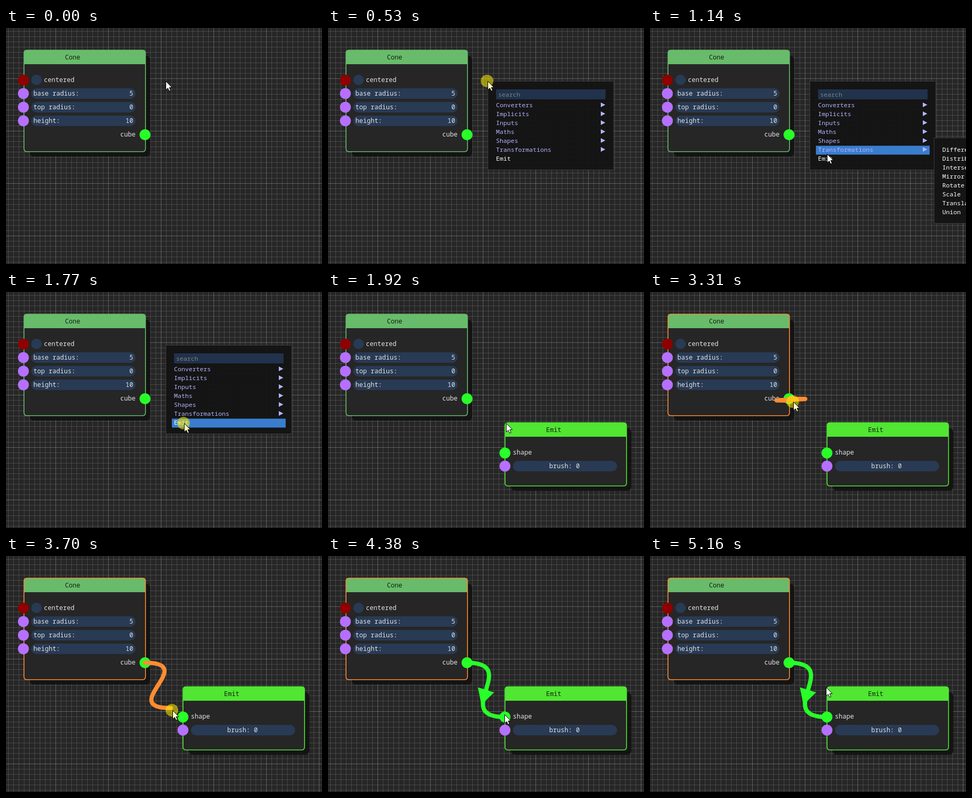
An HTML page that plays this animation: 600x450 px, repeating every 5310 ms.

```html
<!DOCTYPE html>
<html lang="en">
<head>
<meta charset="utf-8">
<title>Node editor</title>
<style>
  html, body { margin: 0; width: 100%; height: 100%; overflow: hidden; background: #262626; }
  svg { display: block; width: 600px; height: 450px; }
  text { font: 12.08px "Noto Sans Mono", "DejaVu Sans Mono", monospace; fill: #e4e4e4; white-space: pre; }
  .menu text { font-size: 11.67px; fill: #fff; }
  .menu .sub { fill: #b4b4ff; }
  .menu .hint { fill: #808080; }
  .title { fill: #12200f; }
</style>
</head>
<body>
<svg id="stage" viewBox="0 0 600 450"></svg>
<script>
const LOOP = 5310;
const GREEN = '#28ff28', ORANGE = '#ff8c32', PURPLE = '#b670ff', FIELD = '#283a54';
const OUT = [264, 203.5], IN = [336, 307];

const text = (x, y, s, cls = '', anchor = 'start') =>
  `<text x="${x}" y="${y + 4}" class="${cls}" text-anchor="${anchor}">${s}</text>`;
const rect = (x, y, w, h, fill, more = '') =>
  `<rect x="${x}" y="${y}" width="${w}" height="${h}" fill="${fill}" ${more}/>`;
const dot = (x, y, fill, r = 10.5, more = '') =>
  `<circle cx="${x}" cy="${y}" r="${r}" fill="${fill}" ${more}/>`;

function grid() {
  const lines = (step, color) => {
    let d = '';
    for (let x = 94 % step; x < 600; x += step) d += `M${x + .5} 0V450`;
    for (let y = 96 % step; y < 450; y += step) d += `M0 ${y + .5}H600`;
    return `<path d="${d}" stroke="${color}" fill="none"/>`;
  };
  return lines(10, 'rgba(200,200,200,.2)') + lines(100, 'rgba(200,200,200,.2)');
}

function node(id, title, x, y, w, h, color) {
  return rect(x + 11, y + 11, w - 2, h - 2, '#101010', 'rx="8" opacity=".88"') +
    rect(x, y, w, h, '#262626', 'rx="5"') +
    `<path d="M${x} ${y + 27}v-22q0-5 5-5h${w - 10}q5 0 5 5v22z" fill="${color}"/>` +
    rect(x + .2, y + .2, w - .4, h - .4, 'none', `id="${id}" rx="5" stroke="${color}" stroke-width="1.6"`) +
    text(x + 92.5, y + 14, title, 'title', 'middle');
}

function slider(y, label, value) {
  return dot(33, y, PURPLE) + rect(48, y - 10, 198, 20, FIELD, 'rx="10"') +
    text(52, y, label) + text(241.5, y, value, '', 'end');
}

const cone = node('coneEdge', 'Cone', 34, 42, 231, 194, '#68bb6b') +
  dot(33, 99.5, '#8f0000') + dot(58, 99, FIELD, 10) + text(72, 99, 'centered') +
  slider(125, 'base radius:', 5) + slider(151, 'top radius:', 0) + slider(177, 'height:', 10) +
  text(217, 203, 'cube') + dot(...OUT, GREEN);

const emit = node('emitEdge', 'Emit', 336, 249, 231, 121, '#50e632') +
  dot(...IN, GREEN, 10.5, 'id="inSocket"') + text(351, 306, 'shape') +
  dot(336, 332, PURPLE) + rect(351, 322, 198, 20, FIELD, 'rx="10"') +
  text(449, 332, 'brush: 0', '', 'middle');

const panel = (x, y, w, h) => rect(x + .5, y + .5, w, h, '#141414', 'fill-opacity=".96" stroke="#3c3c42"');
const rowY = i => 147 + 17 * i;
const groups = ['Converters', 'Implicits', 'Inputs', 'Maths', 'Shapes', 'Transformations'];
const transforms = ['Difference', 'Distribute', 'Intersection', 'Mirror', 'Rotate', 'Scale', 'Translate', 'Union'];

const menu = panel(303, 101, 239, 169) +
  rect(319, 117, 208, 19, '#20324c') + text(323, 127, 'search', 'hint') +
  rect(315, 0, 216, 17, '#3a7dce', 'id="hover"') +
  groups.map((s, i) => text(319, rowY(i), s, 'sub') +
    `<path d="M518 ${rowY(i) - 5}l8.5 4.5l-8.5 4.5z" fill="#b4b4ff"/>`).join('') +
  text(319, rowY(6), 'Emit');
const submenu = panel(539, 209, 200, 163) +
  transforms.map((s, i) => text(555, rowY(i + 5), s)).join('');

document.getElementById('stage').innerHTML =
  rect(0, 0, 600, 450, '#262626') + grid() + cone +
  `<g id="emit">${emit}</g>
  <path id="link" fill="none" stroke-width="8" stroke-linecap="round"/>
  <path id="arrow" fill="${GREEN}"/>
  <g id="menu" class="menu">${menu}</g><g id="submenu" class="menu">${submenu}</g>
  <g id="pointer">${dot(-1, 0, '#fff000', 12, 'id="press" opacity=".54"')}
    <path id="cursor" d="M.5 .5V17L4.3 13.5L6.9 19.3L9.6 18.1L7.1 12.4H12Z" stroke="#000"/></g>`;

// Each step lists only what changes at its time.
const steps = [
  [0, { at: [303, 101] }],
  [530, { menu: 1, press: 1 }],
  [610, { press: 0 }],
  [990, { at: [306, 114] }],
  [1070, { at: [323, 192], row: 3 }],
  [1140, { at: [336, 240], row: 5, submenu: 1 }],
  [1220, { at: [338, 248], row: 6, submenu: 0 }],
  [1300, { at: [338, 249] }],
  [1370, { at: [338, 250] }],
  [1770, { press: 1 }],
  [1920, { menu: 0, press: 0, emit: 1 }],
  [2300, { at: [335, 247] }],
  [2380, { at: [318, 234] }],
  [2460, { at: [296, 219] }],
  [2530, { at: [280, 210] }],
  [2610, { at: [272, 207] }],
  [2690, { at: [270, 206] }],
  [3160, { press: 1, active: 1 }],
  [3310, { at: [272, 209], end: [271, 207] }],
  [3390, { at: [278, 224], end: [274, 215] }],
  [3460, { at: [288, 246], end: [284, 236] }],
  [3540, { at: [299, 268], end: [295, 260] }],
  [3620, { at: [310, 285], end: [306, 279] }],
  [3700, { at: [316, 294], end: [313, 290] }],
  [3760, { at: [328, 300], end: [324, 298] }],
  [3840, { at: [334, 302], end: [332, 301], snap: 1 }],
  [3920, { at: [335, 302], end: [335, 302] }],
  [4380, { press: 0, snap: 0, end: IN, linked: 1 }],
  [4940, { at: [334, 296] }],
  [5010, { at: [331, 274] }],
  [5090, { at: [332, 256] }],
  [5160, { at: [334, 250] }],
];

const el = id => document.getElementById(id);
const show = (id, on) => el(id).style.display = on ? '' : 'none';
const set = (id, name, value) => el(id).setAttribute(name, value);

function drawLink([x, y], linked) {
  const [sx, sy] = OUT, bend = 103.6;
  set('link', 'd', `M${sx} ${sy}C${sx + bend} ${sy} ${x - bend} ${y} ${x} ${y}`);
  set('link', 'stroke', linked ? GREEN : ORANGE);
  const dx = 2 * (x - sx - bend), dy = 2 * (y - sy), len = Math.hypot(dx, dy);
  const ux = dx / len, uy = dy / len, mx = (sx + x) / 2, my = (sy + y) / 2;
  const corner = (along, side) => `${mx + ux * along - uy * side} ${my + uy * along + ux * side}`;
  set('arrow', 'd', `M${corner(0, 16)}L${corner(0, -16)}L${corner(30, 0)}Z`);
}

function draw(s) {
  for (const id of ['menu', 'submenu', 'press', 'emit']) show(id, s[id]);
  show('hover', s.row !== undefined);
  if (s.row !== undefined) set('hover', 'y', rowY(s.row) - 8 + .5);
  set('pointer', 'transform', `translate(${s.at})`);
  set('cursor', 'fill', s.press ? '#ffffc8' : '#fff');
  set('coneEdge', 'stroke', s.active ? ORANGE : '#68bb6b');
  set('inSocket', 'r', s.snap ? 15 : 10.5);
  show('link', s.end);
  show('arrow', s.linked);
  if (s.end) drawLink(s.end, s.linked);
}

let shown = -1;
function tick() {
  const t = performance.now() % LOOP;
  const past = steps.filter(([start]) => start <= t);
  if (past.length !== shown) {
    shown = past.length;
    draw(Object.assign({}, ...past.map(([, change]) => change)));
  }
  requestAnimationFrame(tick);
}
tick();
</script>
</body>
</html>
```
